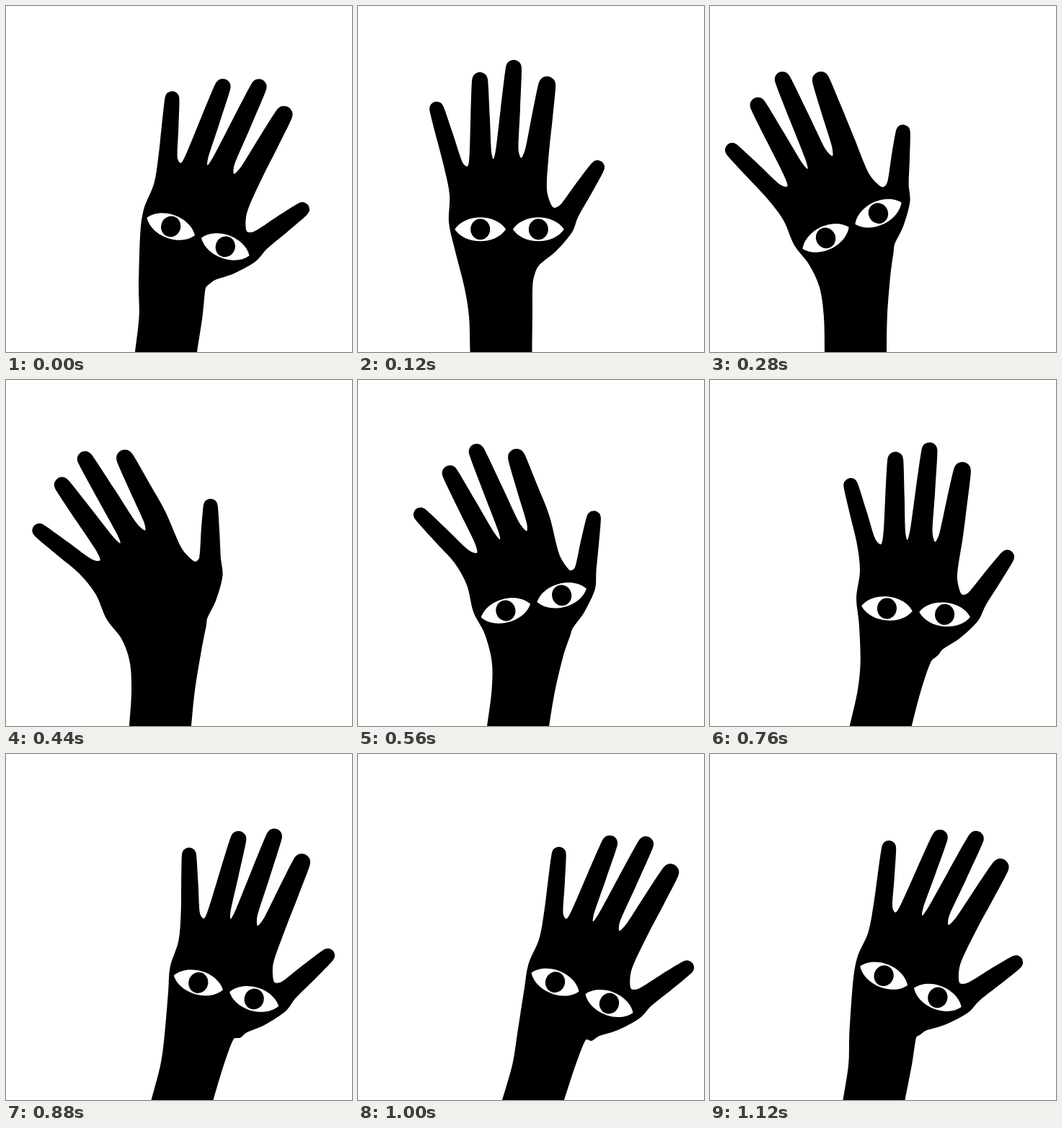
These frames come from a looping animation (480x480 px, 1160 ms). An HTML page with a canvas:

```html
<!DOCTYPE html>
<html lang="en">
<head>
<meta charset="utf-8">
<title>Waving hand</title>
<style>
  html, body { margin: 0; width: 100%; height: 100%; overflow: hidden; background: #fff; }
  canvas { display: block; width: 100vw; height: 100vh; }
</style>
</head>
<body>
<canvas id="stage" width="480" height="480"></canvas>
<script>
const ctx = document.getElementById('stage').getContext('2d');
const LOOP = 1160, STEP = 40, RAD = Math.PI / 180;

// Upright hand, measured from the point between the eyes
const fingers = [
  { base: [-75, -80], tip: [-103, -177], root: 13.5, end: 10 },
  { base: [-40, -96], tip: [-40, -218], root: 15.5, end: 11 },
  { base: [-4, -99], tip: [8, -235], root: 16, end: 11 },
  { base: [37, -99], tip: [55, -212], root: 17, end: 12 }
];
const thumb = { base: [78, -18], tip: [128, -94], root: 15.5, end: 10 };
const side = [[-77, 23], [-84, -10], [-83, -48]];
const web = [[52, -55], [60, -31]];
const heel = [[87, 4], [65, 30], [43, 48], [37, 57]];

// time, hand angle, hand x, foot of the arm
const keys = [
  [0, 20.3, 266.5, 222],
  [120, 0, 210, 198.5],
  [280, -25.2, 197, 202],
  [440, -25.2, 220, 214],
  [680, -2, 269, 230],
  [880, 16.3, 305.5, 244.5],
  [1000, 21.5, 311, 243],
  [1120, 22, 278.5, 227.5]
];

function key(i) {
  const n = keys.length, turn = Math.floor(i / n);
  const [t, ...rest] = keys[i - turn * n];
  return [t + turn * LOOP, ...rest];
}

// Smooth periodic curve through the keys
function pose(t) {
  let i = keys.length - 1;
  while (keys[i][0] > t) i--;
  const [a, b, c, d] = [key(i - 1), key(i), key(i + 1), key(i + 2)];
  const h0 = b[0] - a[0], h = c[0] - b[0], h2 = d[0] - c[0];
  const u = (t - b[0]) / h;
  return b.map((v, j) => {
    const s0 = (v - a[j]) / h0, s = (c[j] - v) / h, s2 = (d[j] - c[j]) / h2;
    const m0 = (s0 * h + s * h0) / (h0 + h);
    const m1 = (s * h2 + s2 * h) / (h + h2);
    const w = u * u * (3 - 2 * u);
    return v + (c[j] - v) * w + h * u * (1 - u) * (m0 * (1 - u) - m1 * u);
  });
}

const mix = (p, q, u) => p.map((v, i) => v + (q[i] - v) * u);

// Tapered finger with a round tip, turned about its base
function fingerPoints({ base, tip, root, end }, bend) {
  const dx = tip[0] - base[0], dy = tip[1] - base[1];
  const len = Math.hypot(dx, dy), dir = Math.atan2(dy, dx) + bend * RAD;
  const c = Math.cos(dir), s = Math.sin(dir);
  const at = (along, off) => [base[0] + along * c - off * s, base[1] + along * s + off * c];
  const edge = (u, sign) => at(u * len, sign * (root + (end - root) * u));
  const cap = [];
  for (let a = -90; a <= 90; a += 45) {
    cap.push(at(len - end + end * Math.cos(a * RAD), end * Math.sin(a * RAD)));
  }
  return [edge(0.1, -1), edge(0.5, -1), ...cap, edge(0.5, 1), edge(0.1, 1)];
}

function handPoints(bend) {
  const pts = [...side];
  fingers.forEach((f, i) => {
    if (i) pts.push(mix(fingers[i - 1].base, f.base, 0.5));
    pts.push(...fingerPoints(f, bend));
  });
  return [...pts, ...web, ...fingerPoints(thumb, bend * 0.7), ...heel];
}

function trace(pts) {
  const n = pts.length;
  ctx.beginPath();
  ctx.moveTo(...pts[0]);
  for (let i = 0; i < n; i++) {
    const a = pts[(i + n - 1) % n], b = pts[i], c = pts[(i + 1) % n], d = pts[(i + 2) % n];
    // Handles stay short next to a close neighbour
    const reach = Math.hypot(c[0] - b[0], c[1] - b[1]) / 3;
    const handle = (p, q) => {
      const x = q[0] - p[0], y = q[1] - p[1], l = Math.hypot(x, y) || 1;
      const k = Math.min(1 / 6, reach / l);
      return [x * k, y * k];
    };
    const m = handle(a, c), k = handle(b, d);
    ctx.bezierCurveTo(b[0] + m[0], b[1] + m[1], c[0] - k[0], c[1] - k[1], c[0], c[1]);
  }
  ctx.closePath();
}

function drawEye(x, open) {
  if (open <= 0) return;
  ctx.save();
  ctx.translate(x, 0);
  ctx.scale(1, open);
  ctx.beginPath();
  ctx.moveTo(-35.5, 0);
  ctx.bezierCurveTo(-21, -22, 21, -22, 35.5, 0);
  ctx.bezierCurveTo(21, 22, -21, 22, -35.5, 0);
  ctx.fillStyle = '#fff';
  ctx.fill();
  ctx.beginPath();
  ctx.ellipse(0, 0, 13.5, 14.5, 0, 0, 2 * Math.PI);
  ctx.fillStyle = '#000';
  ctx.fill();
  ctx.restore();
}

function draw(t) {
  const [, deg, x, foot] = pose(t);
  const y = 309.7 + 0.0014 * (x - 200) ** 2 + 0.2 * deg;
  const lean = (x - foot - 13 - 0.7 * deg) / 2.6;
  const bend = -13 * Math.exp(-(((t - 540) / 230) ** 2));
  const cos = Math.cos(deg * RAD), sin = Math.sin(deg * RAD);
  const place = ([px, py]) => [x + px * cos - py * sin, y + px * sin + py * cos];
  const arm = (h, off) => [foot + lean * h / 50 - Math.max(0, h - 50) * 0.06 + off, 480 - h];

  ctx.fillStyle = '#fff';
  ctx.fillRect(0, 0, 480, 480);
  trace([
    ...handPoints(bend).map(place),
    mix(place([33, 68]), arm(90, 47), 0.6),
    arm(50, 44), arm(0, 43), arm(-30, 43),
    arm(-30, -43), arm(0, -43), arm(50, -44), arm(90, -47.5)
  ]);
  ctx.fillStyle = '#000';
  ctx.fill();

  const open = Math.min(1, Math.max(0, (Math.abs(t - 440) - 20) / 80));
  ctx.save();
  ctx.translate(x, y);
  ctx.rotate(deg * RAD);
  drawEye(-40.3, open);
  drawEye(40.3, open);
  ctx.restore();
}

const start = performance.now();
function tick() {
  const t = (performance.now() - start) % LOOP;
  draw(Math.floor(t / STEP) * STEP);
  requestAnimationFrame(tick);
}
tick();
</script>
</body>
</html>
```
